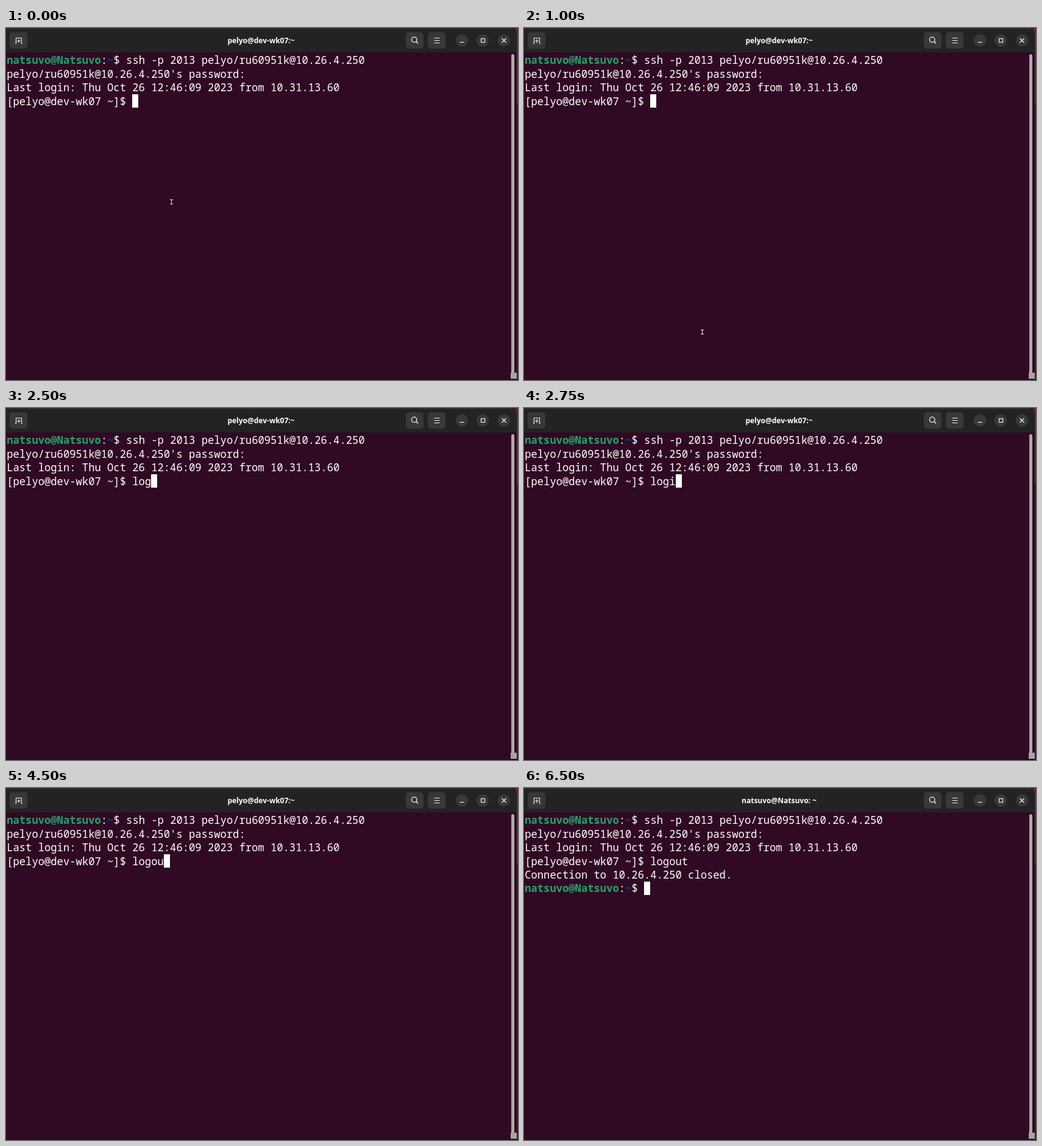
An HTML page with a canvas for the animation above (7.25 s loop, 840 px wide and 579 px high).

```html
<!DOCTYPE html>
<html lang="en">
<head>
<meta charset="utf-8">
<title>Terminal</title>
<style>
html, body { margin: 0; width: 100%; height: 100%; overflow: hidden; background: #300a24; }
canvas { display: block; }
</style>
</head>
<body>
<canvas id="stage" width="840" height="579"></canvas>
<script>
const ctx = document.getElementById('stage').getContext('2d');

const W = 840, H = 579, LOOP = 7250;
const CELL = 10.31, LINE = 22.4, LEFT = 1.2, TOP = 42;
const MONO = '17.18px "Noto Sans Mono", monospace';
const TITLE = 'bold 12px "Noto Sans", sans-serif';
const BG = '#300a24', BAR = '#232323', BUTTON = '#383838';
const WHITE = '#ffffff', GREEN = '#26a269', BLUE = '#12488b';

const LOCAL = 'natsuvo@Natsuvo';
const REMOTE = 'pelyo@dev-wk07';
const LOGIN = 'pelyo/ru60951k@10.26.4.250';
const PROMPT = `[${REMOTE} ~]$ `;
const CLOSED = 5500;

// [start time, value] steps
const TYPED = [
  [0, ''], [2250, 'lo'], [2500, 'log'], [2750, 'logi'], [3000, 'logit'],
  [3250, 'log'], [3500, 'logoit'], [4000, 'logo'], [4500, 'logou'], [4750, 'logout']
];
const POINTER = [[0, [271, 286]], [250, [286, 516]], [500, [292, 500]], [2000, null]];
const CURSOR = [[0, true], [5250, false], [5500, true], [6000, false], [6500, true]];

function at(steps, t) {
  let value;
  for (const [start, v] of steps) if (t >= start) value = v;
  return value;
}

function box(x, y, w, h, color, r = 0) {
  ctx.fillStyle = color;
  ctx.beginPath();
  ctx.roundRect(x, y, w, h, r);
  ctx.fill();
}

function disc(x, y, r, color) {
  ctx.fillStyle = color;
  ctx.beginPath();
  ctx.arc(x, y, r, 0, Math.PI * 2);
  ctx.fill();
}

function lines(color, width, ...paths) {
  ctx.strokeStyle = color;
  ctx.lineWidth = width;
  ctx.beginPath();
  for (const [x, y, ...rest] of paths) {
    ctx.moveTo(x, y);
    for (let i = 0; i < rest.length; i += 2) ctx.lineTo(rest[i], rest[i + 1]);
  }
  ctx.stroke();
}

function print(row, col, text, color = WHITE, bold = false) {
  ctx.font = (bold ? 'bold ' : '') + MONO;
  ctx.textAlign = 'left';
  ctx.fillStyle = color;
  ctx.fillText(text, LEFT + col * CELL, TOP + 17.4 + row * LINE);
}

function localPrompt(row, command) {
  print(row, 0, LOCAL, GREEN, true);
  print(row, 15, ':');
  print(row, 16, '~', BLUE, true);
  print(row, 17, '$ ' + command);
}

function drawBar(title) {
  box(0, 0, 838, 40, BAR, [0, 9, 0, 0]);
  box(0, 0, 830, 1, '#383838');
  for (const x of [6, 656, 692]) box(x, 7, 29, 27, BUTTON, 5);
  for (const x of [748, 782, 817]) disc(x, 20.5, 10.3, BUTTON);

  // new tab
  lines('#e6e6e6', 1.2,
    [15, 25.5, 16.5, 25.5, 16.5, 16.5, 25.5, 16.5, 25.5, 25.5, 27, 25.5],
    [21, 18.5, 21, 24.5], [18, 21.5, 24, 21.5]);
  // search
  ctx.strokeStyle = '#f0f0f0';
  ctx.lineWidth = 1.3;
  ctx.beginPath();
  ctx.arc(669.7, 19.2, 4.3, 0, Math.PI * 2);
  ctx.stroke();
  lines('#f0f0f0', 1.5, [672.8, 22.3, 676, 25.5]);
  // menu
  lines('#f0f0f0', 1.2, [702.5, 16.5, 711.5, 16.5], [702.5, 20.5, 711.5, 20.5], [702.5, 24.5, 711.5, 24.5]);
  // window buttons
  lines('#f0f0f0', 1.2, [744.5, 23.5, 751.5, 23.5]);
  ctx.strokeRect(779.5, 17.5, 6, 6);
  lines('#f0f0f0', 1.3, [813.5, 17, 820.5, 24], [820.5, 17, 813.5, 24]);

  ctx.font = TITLE;
  ctx.textAlign = 'center';
  ctx.fillStyle = WHITE;
  ctx.fillText(title, 418.5, 24.5);
}

function drawFrame() {
  box(0, 0, W, H, '#4a1230');
  box(836, 0, 4, 125, '#762040');
  box(0, 0, 838, H, BG, [0, 9, 0, 0]);
  box(0, 577, 838, 2, '#2a0a20');
  box(829, 43, 5, 526, '#b0a9a8', 2.5);
  box(828, 567, 10, 10, '#a9a3a4');
}

function drawPointer([x, y]) {
  lines('#e8e4e6', 1,
    [x - 2, y - 3.5, x + 3, y - 3.5], [x - 2, y + 3.5, x + 3, y + 3.5],
    [x + 0.5, y - 3.5, x + 0.5, y + 3.5]);
}

function draw(t) {
  const closed = t >= CLOSED;
  const typed = at(TYPED, t);
  const pointer = at(POINTER, t);

  drawFrame();
  drawBar(closed ? LOCAL + ': ~' : REMOTE + ':~');

  localPrompt(0, 'ssh -p 2013 ' + LOGIN);
  print(1, 0, LOGIN + "'s password:");
  print(2, 0, 'Last login: Thu Oct 26 12:46:09 2023 from 10.31.13.60');
  print(3, 0, PROMPT + typed);
  if (closed) {
    print(4, 0, 'Connection to 10.26.4.250 closed.');
    localPrompt(5, '');
  }

  if (at(CURSOR, t)) {
    const row = closed ? 5 : 3;
    const col = closed ? 19 : PROMPT.length + typed.length;
    box(Math.round(LEFT + col * CELL), Math.round(TOP + row * LINE), 10, 22, WHITE);
  }
  if (pointer) drawPointer(pointer);
}

const begin = performance.now();
function tick() {
  draw((performance.now() - begin) % LOOP);
  requestAnimationFrame(tick);
}
tick();
</script>
</body>
</html>
```
